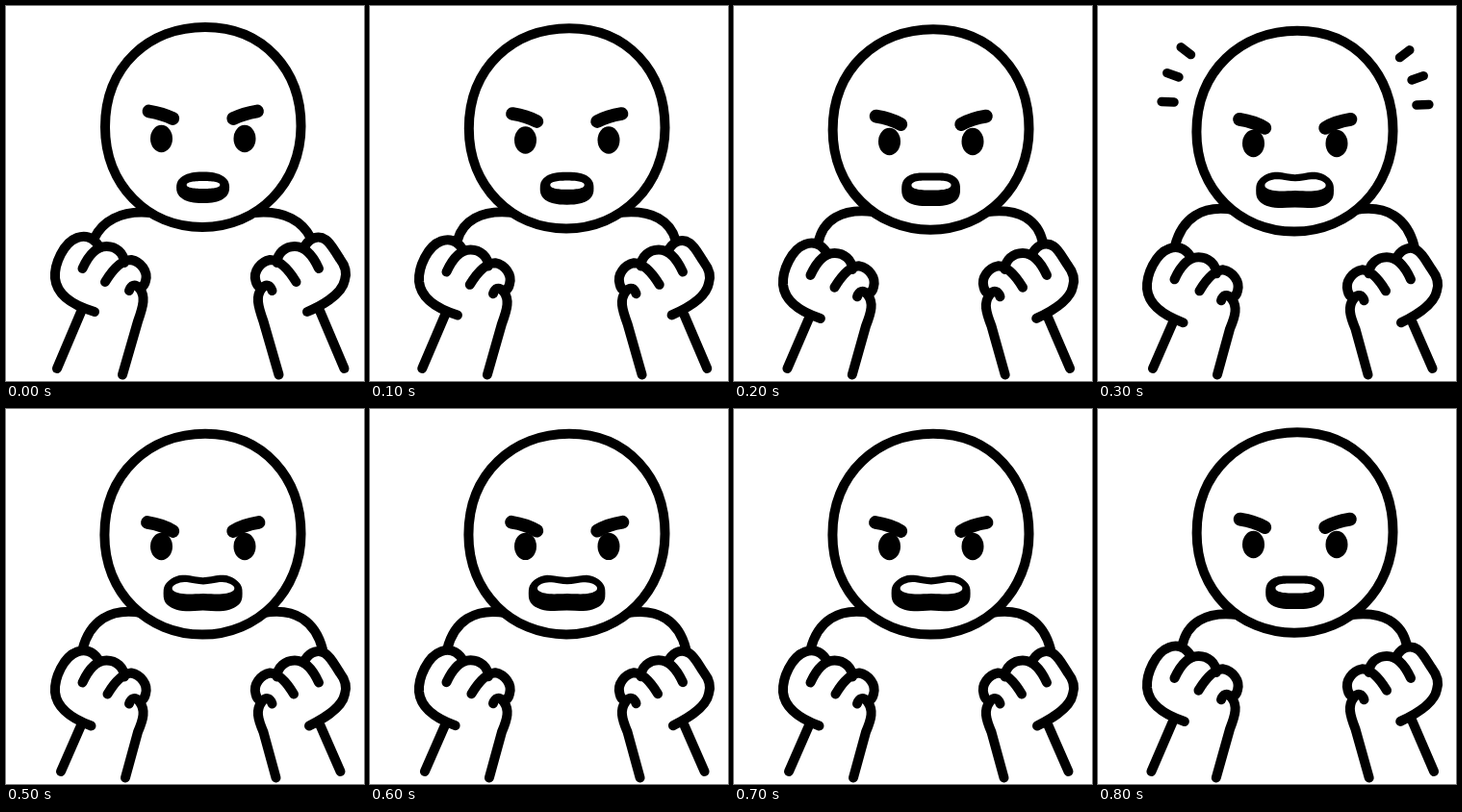
These frames come from a looping animation (372 by 390 pixels, 0.9 s). An HTML page:

```html
<!DOCTYPE html>
<html lang="en">
<head>
<meta charset="utf-8">
<title>Angry figure</title>
<style>
  html, body { margin: 0; width: 100%; height: 100%; overflow: hidden; background: #fff; }
  svg { display: block; width: 100%; height: 100%; }
  .line { fill: none; stroke: #000; stroke-width: 10; stroke-linecap: round; stroke-linejoin: round; }
  .head { fill: #fff; }
  .brow { stroke-width: 13.8; }
  .burst { stroke-width: 9.4; }
</style>
</head>
<body>
<svg viewBox="0 0 372 390">
  <path class="line shoulder"/>
  <path class="line shoulder" transform="matrix(-1 0 0 1 408.5 0)"/>
  <path class="line head"/>
  <path class="line fists"/>
  <path class="line fingers"/>
  <path class="line fingers" transform="matrix(-1 0 0 1 404.5 0)"/>
  <path class="line arm"/>
  <path class="line arm" transform="matrix(-1 0 0 1 404.5 0)"/>
  <ellipse class="eye" cx="161.5" rx="11.5" ry="14.2"/>
  <ellipse class="eye" cx="248" rx="11.5" ry="14.2"/>
  <path class="line brow"/>
  <path class="line brow" transform="matrix(-1 0 0 1 409.5 0)"/>
  <path class="lips"/>
  <path class="teeth" fill="#fff"/>
  <path class="line burst"/>
  <path class="line burst" transform="matrix(-1 0 0 1 410 3)"/>
</svg>
<script>
const STEP = 100;
// Anger per step: 0 calm, 1 shouting
const ANGER = [0, 0.3, 0.6, 0.985, 0.97, 1, 0.97, 1, 0.6];
// Burst lines show from step 3 and fly outwards for two steps
const BURST_START = 3, BURST_STEPS = 2;

const set = (name, key, value) =>
  document.querySelectorAll('.' + name).forEach(e => e.setAttribute(key, value));
const draw = (name, d) => set(name, 'd', d);
const lerp = (a, b, t) => a + (b - a) * t;
const power = (v, e) => Math.sign(v) * Math.abs(v) ** e;

// Rounded blob with a wavy upper edge
function blob(cx, cy, w, h, e, wave) {
  const n = 64, pts = [];
  for (let i = 0; i < n; i++) {
    const a = i / n * 2 * Math.PI, s = Math.sin(a);
    const dx = w * power(Math.cos(a), e);
    const ripple = wave * Math.cos(dx / 8) * Math.abs(s) * (s < 0 ? 1 : -0.35);
    pts.push([cx + dx, cy + h * power(s, e) + ripple]);
  }
  return 'M' + pts.join('L') + 'Z';
}

function drawHead(q) {
  const left = lerp(103, 102.4, q), top = lerp(22, 25.8, q);
  const mid = lerp(126, 131, q), low = lerp(230, 234.6, q);
  draw('head', `M${left} ${mid}C${left} ${mid - 64} 149 ${top} 207 ${top}
    C268 ${top} 306.5 ${mid - 59} 306.5 ${mid - 1}
    C306.5 ${mid + 58} 262 ${low} 204 ${low}C147 ${low} ${left} ${mid + 60} ${left} ${mid}Z`);
}

function drawFace(q) {
  const open = q ** 3;
  set('eye', 'cy', lerp(138, 143, q));
  const outer = lerp(109.5, 118, q), inner = lerp(117, 127, q);
  draw('brow', `M${lerp(148.5, 147, q)} ${outer}Q163 ${outer + 2.5} 173.3 ${inner}`);
  draw('lips', blob(204.6, lerp(188.8, 191.8, q), lerp(27.5, 41, open),
    lerp(16.3, 18.5, q), lerp(0.85, 0.68, q), 2 * open));
  draw('teeth', blob(205, lerp(186, 186.6, q), lerp(17.3, 32.3, open),
    lerp(4, 6.2, q), 0.85, 2 * open));
}

function drawBody(q) {
  const rise = q * q;
  draw('shoulder', `M${lerp(92, 79.5, rise)} ${lerp(241, 250, q)}
    C${lerp(100, 87, q)} ${lerp(225, 221, q)} ${lerp(118, 108, q)} ${lerp(212, 206, rise)}
    ${lerp(150, 141, q)} ${lerp(215, 212, rise)}`);

  const shift = `M0 ${11.5 * q}m`;
  draw('fists', `${shift}96 249c-6 -9 -14 -11 -22 -8c-14 5 -24 27 -23 42c2 20 24 30 ${lerp(41, 37.5, q)} 35
    ${shift}311 249c5 -8 14 -11 21 -6c6 4 10 13 15 20c7 9 7 16 5 22c-3 16 -27 28 ${lerp(-39, -37, q)} 33`);
  draw('fingers', `${shift}79.5 273c5 -11 13 -23 25 -23c10 0 18 7 18.5 17
    ${shift}${lerp(103, 105.5, q)} ${lerp(287, 285, q)}Q${lerp(117, 118, q)} ${264 + 11.5 * q} 130 ${lerp(264, 274.5, q)}
    c10 2 18 12 15 22q-1 5 -5 7
    ${shift}128 ${lerp(296, 295, q)}c2 -6 6 -7 10 -3`);

  const wrist = lerp(294, 305, q), bend = lerp(328, 336, q);
  draw('arm', `M78 ${lerp(318, 329, q)}L${lerp(53, 57, q)} 377
    M139 ${wrist}C145 ${wrist + 8} 143 ${wrist + 17} 137 ${bend}L${lerp(121, 124, q)} 383.5`);
}

function drawBurst(age) {
  let d = '';
  if (age >= 0 && age < BURST_STEPS) {
    for (let i = 0; i < 3; i++) {
      const a = (2 + 17.5 * i) * Math.PI / 180, c = Math.cos(a), s = Math.sin(a);
      const near = 87 + 19.5 * age, far = near + 13;
      d += `M${166 - near * c} ${103 - near * s}L${166 - far * c} ${103 - far * s}`;
    }
  }
  draw('burst', d);
}

function render(step) {
  const q = ANGER[step];
  drawHead(q);
  drawFace(q);
  drawBody(q);
  drawBurst(step - BURST_START);
}

let start, shown = -1;
function tick(now) {
  start ??= now;
  const step = Math.floor((now - start) / STEP) % ANGER.length;
  if (step !== shown) render(shown = step);
  requestAnimationFrame(tick);
}
render(0);
requestAnimationFrame(tick);
</script>
</body>
</html>
```
